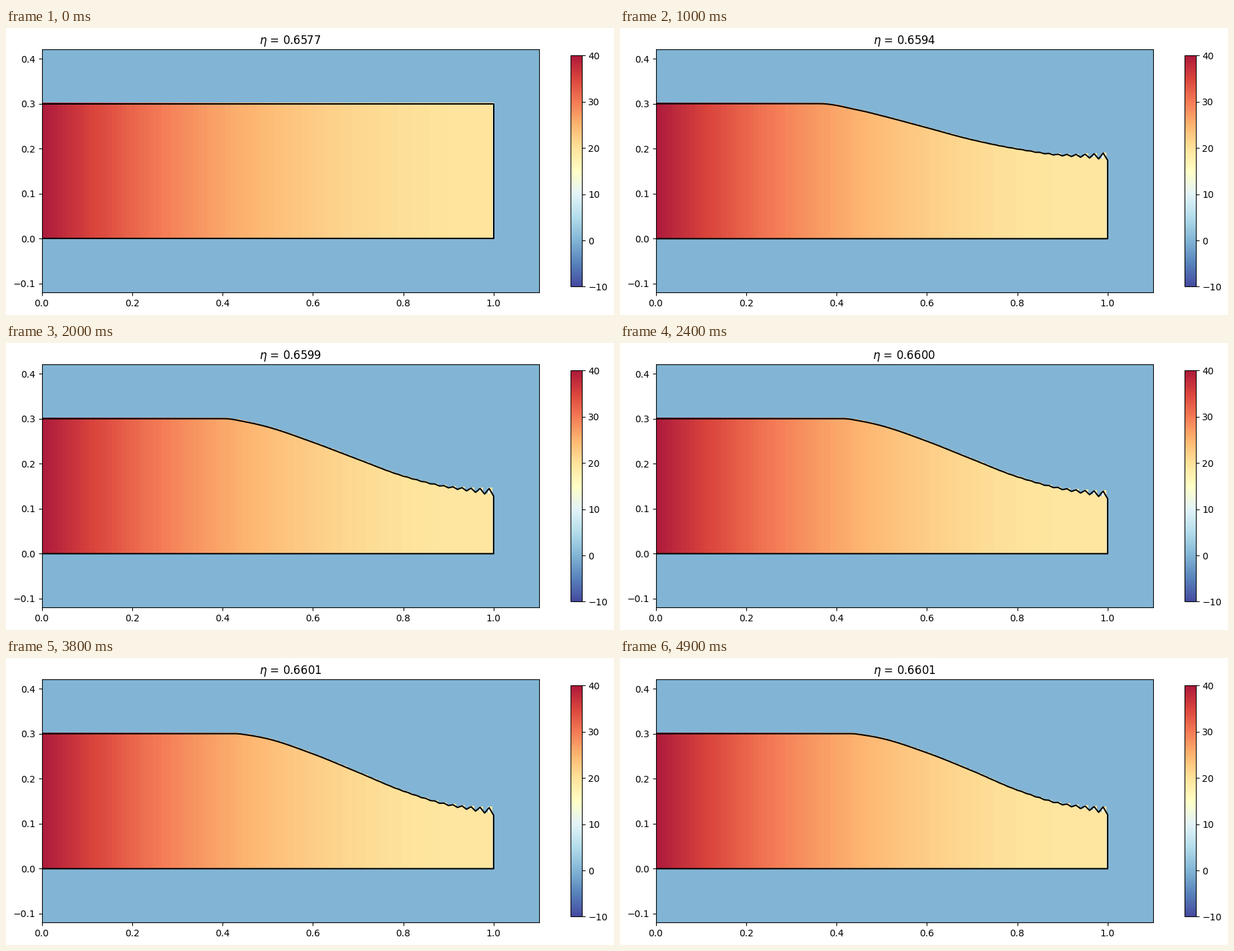
A matplotlib script that plays this animation: 910 px wide and 431 px high, repeating every 5000 ms.

```python
import numpy as np
import matplotlib.pyplot as plt
from matplotlib.animation import FuncAnimation

W, H, DPI = 910, 431, 100
FRAMES, INTERVAL = 50, 100
BASE_TEMP, EDGE_TEMP = 40, 11

# Optimisation milestones: frame, end of the flat part, fin efficiency,
# and the mean half-height at the stations below.
STATIONS = [0.45, 0.5, 0.6, 0.7, 0.8, 0.9, 1.0]
STEPS = np.array([0, 6, 15, 20, 29, 38, 49])
FLAT_END = [0.32, 0.345, 0.385, 0.405, 0.425, 0.43, 0.435]
EFFICIENCY = [0.6577, 0.6590, 0.6598, 0.65993, 0.66003, 0.66008, 0.66012]
HEIGHTS = np.array([
    [0.3, 0.3, 0.3, 0.3, 0.3, 0.3, 0.3],
    [0.2835, 0.272, 0.2516, 0.236, 0.2235, 0.2165, 0.2175],
    [0.2895, 0.2765, 0.244, 0.210, 0.1805, 0.160, 0.152],
    [0.293, 0.2815, 0.2475, 0.2095, 0.1725, 0.148, 0.1365],
    [0.297, 0.2865, 0.2523, 0.211, 0.170, 0.1415, 0.127],
    [0.2978, 0.2885, 0.255, 0.214, 0.1725, 0.142, 0.127],
    [0.2983, 0.2895, 0.2575, 0.2175, 0.1747, 0.1435, 0.1285],
])


def smooth(x, xs, ys):
    """Monotone cubic interpolation."""
    xs, ys = np.asarray(xs, float), np.asarray(ys, float)
    dx = np.diff(xs)
    slope = np.diff(ys) / dx
    a, b = slope[:-1], slope[1:]
    same = a * b > 0
    inner = np.where(same, 2 * a * b / np.where(same, a + b, 1), 0)
    m = np.concatenate([slope[:1], inner, slope[-1:]])
    i = np.clip(np.searchsorted(xs, x, side="right") - 1, 0, len(dx) - 1)
    t = (x - xs[i]) / dx[i]
    return (ys[i] * (1 + 2 * t) * (1 - t) ** 2 + ys[i + 1] * t * t * (3 - 2 * t)
            + dx[i] * t * (1 - t) * (m[i] * (1 - t) - m[i + 1] * t))


NODES = np.arange(101)
NODE_X = NODES / 100
COL = np.arange(200)
COL_X = (COL + 0.5) / 200
NEAR = (COL + 1) // 2
ROW_Y = -0.12 + (np.arange(540)[:, None] + 0.5) / 1000


def profile(frame):
    flat = smooth(frame, STEPS, FLAT_END)
    means = [smooth(frame, STEPS, column) for column in HEIGHTS.T]
    h = smooth(NODE_X, [0, flat] + STATIONS, [0.3, 0.3] + means)
    ripple = 0.0085 * min(1, frame / 4) * np.exp((NODE_X - 1) / 0.063)
    return h - ripple * (-1.0) ** NODES


def temperature(frame, h):
    m = 1.335
    temp = BASE_TEMP * np.cosh(m * (1 - NODE_X)) / np.cosh(m)
    temp -= 0.6 * min(1, frame / 6) * NODE_X ** 2
    cols = temp[NEAR]
    cols[-1] = EDGE_TEMP
    top = np.where(COL_X < 0.85, np.interp(COL_X, NODE_X, h), h[NEAR])
    field = np.zeros((540, 220))
    field[:, :200] = np.where((ROW_Y > 0) & (ROW_Y < top), cols, 0)
    # Cells next to a rising tooth are only half filled.
    rising = (COL % 2 == 1) & (COL_X > 0.85) & (h[NEAR] > h[COL // 2])
    half = rising & (ROW_Y > h[COL // 2]) & (ROW_Y < top)
    field[:, :200][half] = EDGE_TEMP
    return field


def pixel_axes(left, top, width, height):
    return fig.add_axes([(left + 0.5) / W, (H - top - height - 0.5) / H,
                         width / W, height / H])


# The tiny margin keeps the pixel size from being rounded down.
fig = plt.figure(figsize=((W + 1e-6) / DPI, (H + 1e-6) / DPI), dpi=DPI,
                 facecolor="white")
ax = pixel_axes(53, 32, 744, 365)
image = ax.imshow(np.zeros((540, 220)), extent=(0, 1.1, -0.12, 0.42),
                  origin="lower", aspect="auto", interpolation="nearest",
                  cmap="RdYlBu_r", vmin=-10, vmax=40, alpha=0.9)
outline, = ax.plot([], [], color="black", lw=1.5)
ax.set_xlim(0, 1.1)
ax.set_ylim(-0.12, 0.42)
title = ax.set_title("")
fig.colorbar(image, cax=pixel_axes(844, 41, 17, 347),
             ticks=[-10, 0, 10, 20, 30, 40])


def update(frame):
    h = profile(frame)
    image.set_data(temperature(frame, h))
    outline.set_data(np.append(NODE_X, [1, 0]), np.append(h, [0, 0]))
    title.set_text(rf"$\eta$ = {smooth(frame, STEPS, EFFICIENCY):.4f}")
    return image, outline, title


anim = FuncAnimation(fig, update, frames=FRAMES, interval=INTERVAL,
                     repeat=True, repeat_delay=0, blit=False)
plt.show()
```
